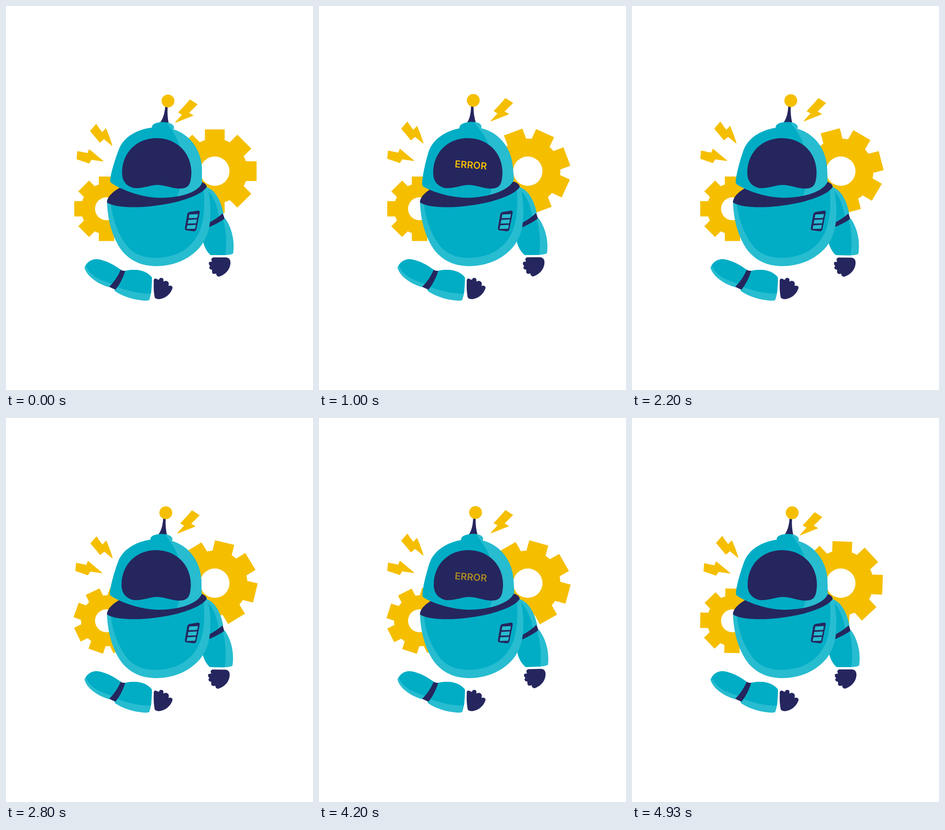
Recreate the animation shown at these times as an HTML page with a canvas. Size 669 by 837 pixels, loop 5.01 s.

```html
<!DOCTYPE html>
<html lang="en">
<head>
<meta charset="utf-8">
<title>Broken robot</title>
<style>
html, body { margin: 0; width: 100%; height: 100%; overflow: hidden; background: #fff; }
canvas { display: block; width: 669px; height: 837px; }
</style>
</head>
<body>
<canvas id="stage"></canvas>
<script>
const W = 669, H = 837, LOOP = 5010;
const TEAL = '#00adc5', LIGHT = '#27bcd0', NAVY = '#25265e', YELLOW = '#f5bf00';
const canvas = document.getElementById('stage');
const ctx = canvas.getContext('2d');
const ratio = window.devicePixelRatio || 1;
canvas.width = W * ratio;
canvas.height = H * ratio;

// Cyclic monotone curve through [step, value] keys.
function track(period, keys) {
  const n = keys.length;
  const key = i => {
    const [x, y] = keys[(i % n + n) % n];
    return [x + Math.floor(i / n) * period, y];
  };
  const secant = i => (key(i + 1)[1] - key(i)[1]) / (key(i + 1)[0] - key(i)[0]);
  const slope = i => {
    const a = secant(i - 1), b = secant(i);
    return a * b <= 0 ? 0 : 2 * a * b / (a + b);
  };
  return step => {
    const x = step % period;
    let i = 0;
    while (key(i + 1)[0] <= x) i++;
    const [x0, y0] = key(i), [x1, y1] = key(i + 1), d = x1 - x0, u = (x - x0) / d;
    const s = u * u * (3 - 2 * u);
    return y0 + (y1 - y0) * s
      + d * u * (1 - u) * (slope(i) * (1 - u) - slope(i + 1) * u);
  };
}

// Second half of the cycle mirrors the first around a middle value.
const swing = (keys, middle) => track(100,
  keys.concat(keys.map(([x, y]) => [x + 50, 2 * middle - y])));

const bigGearTurn = swing([[0, 0], [5, -12], [11, -19.5], [16, -21.6], [19, -21],
  [27, -15.3], [43, -15.3], [49, -2.2]], 0);
const smallGearTurn = swing([[0, 0], [3, -1.8], [11, -0.7], [20, 0], [44, 0], [49, 17]], 9);
const headTurn = track(50, [[0, 0], [2, 0.5], [11, -4.75], [15, -5.8], [19, -5.05],
  [28, -1], [35, -3.45], [44, -1.95], [49, -1.1]]);
const armTurn = track(50, [[0, 0], [11, 1], [19, -0.7], [28, -1.35], [34, -1.65],
  [44, 0.65], [49, 0]]);
const bodyTurn = track(50, [[0, 0], [22, 0], [28, -0.6], [34, 0]]);
const boltRight = track(50, [[0, 0], [4, 0.7], [11, 1], [44, 1], [47, -0.8], [49, -0.55]]);
const boltLow = track(50, [[0, 0], [11, 0.8], [16, 1], [44, 1], [47.5, -0.6], [49, -0.4]]);
const boltHigh = track(50, [[0, 0], [11, -0.3], [18, 1], [44, 1], [49, 0]]);

const clamp = v => Math.max(0, Math.min(1, v));
const textAlpha = step => {
  const s = step % 50;
  return clamp(Math.min((s - 7.5) / 10, (40.5 - s) / 10));
};

const shapes = {
  boltRight: 'M401 204.5L416.5 214.5L398 233L407.5 238.5L369.5 253.5L384.5 237L376 232Q387 221 401 204.5Z',
  boltHigh: 'M196.5 258Q203 268 209.5 276L217.5 267.5Q225 284 231 304L213.5 289.5L204.5 297Q194 284 184 272.5Z',
  boltLow: 'M156 317L178 321.5L181.5 313L211.5 338L186 334.5L181 342.5Q168 338 154.5 333.5Z',

  body: 'M220 425C221 465 231 505 253 534C274 559 301 567 328 567C366 567 402 551 424 524C445 496 446 468 445 435C444 415 441 402 437 392L330 400Z',
  bodyInner: 'M228 428C232 466 246 503 268 528C285 544 305 549 328 549C365 548 395 534 413 507C431 480 434 443 431 400L330 410Z',
  collar: 'M220 428C220 416 234 403 252 394L330 386L426 383C435 387 438 391 437 395C427 410 394 422 363 429C324 437 289 440 262 438C242 437 226 433 220 428Z',
  panel: 'M400 449L418 446Q423 446 422 451L415 486Q414 491 409 491L393 489Q389 488 390 483L395 454Q396 450 400 449Z',

  upperArm: 'M437 395C455 400 469 424 474 454L440 476L430 410Z',
  upperArmInner: 'M439 402C450 411 461 434 464 460L440 476L430 410Z',
  armBand: 'M472 452Q475 457 476 464Q460 475 440 483L441 473Q459 464 472 452Z',
  foreArm: 'M479 465C491 483 499 510 495 539Q492 543 471 543L446 543C437 535 430 522 429 508L441 478L474 460Z',
  foreArmInner: 'M472 462C481 490 481 520 478 543L446 543C437 535 430 522 429 508L441 478Z',
  hand: 'M451 548L480 548Q488 549 489 557C490 572 480 585 464 590Q458 589 458 583Q450 586 449 580L449 575Q442 574 443 569L445 567Q440 562 443 558L449 557Q445 551 451 548Z',

  looseUpper: 'M171 570C176 557 187 551 200 552C220 555 238 566 253 577L230 613L226 613C203 608 175 589 171 570Z',
  looseUpperInner: 'M174 566C180 556 189 551 200 552C220 555 238 566 253 577L232 606C206 597 184 590 174 566Z',
  looseBand: 'M250 575Q255 578 260 577Q253 600 239 618Q232 616 225 612Q241 596 250 575Z',
  looseFore: 'M257 578C281 571 307 576 318 592C318 611 317 628 312 641Q308 643 299 642C277 640 257 634 238 622L234 614Z',
  looseForeInner: 'M257 578C281 571 307 576 318 592L316 627C290 627 266 621 244 613L240 607Z',
  looseHand: 'M322 602Q321 594 326 594L333 597Q335 591 341 593Q344 595 343 601Q348 597 353 601Q356 604 354 610Q362 608 363 614C360 626 349 637 334 639Q326 639 324 635Q321 619 322 602Z',

  head: 'M227 380C228 366 237 335 247 310C258 285 285 269 318 265C318 257 326 254 340 253C356 253 366 258 366 265L365 269C403 281 427 317 427 358L427 386C417 408 374 419 332 418C295 417 252 401 230 386Q227 384 227 380Z',
  headLight: 'M349 250C356 266 374 283 379 310C388 346 386 391 369 422L440 422L440 250Z',
  visor: 'M253 361C254 319 285 288 328 288C373 288 404 321 404 363C403 386 400 398 379 398C362 398 347 390 329 390C311 391 299 398 280 397C262 393 252 381 253 361Z',
  stalk: 'M347 219L352.5 219Q350.5 238 355 258L334 256Q345 244 347 219Z'
};
for (const name in shapes) shapes[name] = new Path2D(shapes[name]);

function fill(name, color) {
  ctx.fillStyle = color;
  ctx.fill(shapes[name]);
}

function disc(x, y, r, color) {
  ctx.fillStyle = color;
  ctx.beginPath();
  ctx.arc(x, y, r, 0, Math.PI * 2);
  ctx.fill();
}

function turned(x, y, degrees, draw) {
  ctx.save();
  ctx.translate(x, y);
  ctx.rotate(degrees * Math.PI / 180);
  ctx.translate(-x, -y);
  draw();
  ctx.restore();
}

function shifted(x, y, draw) {
  ctx.save();
  ctx.translate(x, y);
  draw();
  ctx.restore();
}

function gear(x, y, outer, root, tooth, hole, degrees) {
  disc(x, y, root, YELLOW);
  for (let i = 0; i < 4; i++) {
    turned(x, y, degrees + i * 45, () => ctx.fillRect(x - tooth, y - outer, tooth * 2, outer * 2));
  }
  disc(x, y, hole, '#fff');
}

function bolt(name, amount, dx, dy) {
  shifted(amount * dx, amount * dy, () => {
    fill(name, YELLOW);
    ctx.strokeStyle = YELLOW;
    ctx.lineWidth = 1.4;
    ctx.lineJoin = 'round';
    ctx.stroke(shapes[name]);
  });
}

function drawArm() {
  fill('upperArm', LIGHT);
  fill('upperArmInner', TEAL);
  fill('foreArm', LIGHT);
  fill('foreArmInner', TEAL);
  fill('armBand', NAVY);
  fill('hand', NAVY);
}

function drawBody() {
  fill('body', LIGHT);
  fill('bodyInner', TEAL);
  fill('collar', NAVY);
  fill('panel', NAVY);
  ctx.fillStyle = LIGHT;
  for (let i = 0; i < 3; i++) {
    const x = 399.5 - i * 2.2, y = 454.5 + i * 11.8;
    ctx.beginPath();
    ctx.moveTo(x, y);
    ctx.lineTo(x + 18.8, y - 1);
    ctx.lineTo(x + 17, y + 7.5);
    ctx.lineTo(x - 1.5, y + 8);
    ctx.fill();
  }
}

function drawLooseArm() {
  fill('looseUpper', LIGHT);
  fill('looseUpperInner', TEAL);
  fill('looseFore', LIGHT);
  fill('looseForeInner', TEAL);
  fill('looseBand', NAVY);
  fill('looseHand', NAVY);
}

// The visor slides with the head but stays level.
function drawHead(degrees) {
  turned(329, 411, degrees, () => {
    fill('stalk', NAVY);
    disc(353, 207, 14, YELLOW);
    fill('head', TEAL);
    ctx.clip(shapes.head);
    fill('headLight', LIGHT);
  });
  shifted(degrees * 0.88, 0, () => fill('visor', NAVY));
}

function drawText(alpha) {
  if (!alpha) return;
  ctx.globalAlpha = alpha;
  turned(331, 346.5, 4, () => {
    ctx.fillStyle = YELLOW;
    ctx.font = '600 21px Inter, "Liberation Sans", sans-serif';
    ctx.textAlign = 'center';
    ctx.textBaseline = 'alphabetic';
    ctx.fillText('ERROR', 331, 354);
  });
  ctx.globalAlpha = 1;
}

function draw(step) {
  ctx.setTransform(ratio, 0, 0, ratio, 0, 0);
  ctx.fillStyle = '#fff';
  ctx.fillRect(0, 0, W, H);
  gear(455, 360, 91, 71, 21.5, 32, bigGearTurn(step));
  gear(219, 442, 70.3, 55.5, 16.7, 25, smallGearTurn(step));
  bolt('boltRight', boltRight(step), 5.5, -3);
  bolt('boltHigh', boltHigh(step), -4, -5);
  bolt('boltLow', boltLow(step), -5, -1);
  turned(437, 397, armTurn(step), drawArm);
  turned(328, 567, bodyTurn(step), drawBody);
  drawLooseArm();
  drawHead(headTurn(step));
  drawText(textAlpha(step));
}

// Steps last 30 and 70 ms in turn.
function stepAt(ms) {
  const t = ms % LOOP;
  return Math.min(99, Math.floor(t / 100) * 2 + (t % 100 >= 30 ? 1 : 0));
}

const start = performance.now();
function tick() {
  draw(stepAt(performance.now() - start));
  requestAnimationFrame(tick);
}
tick();
</script>
</body>
</html>
```
